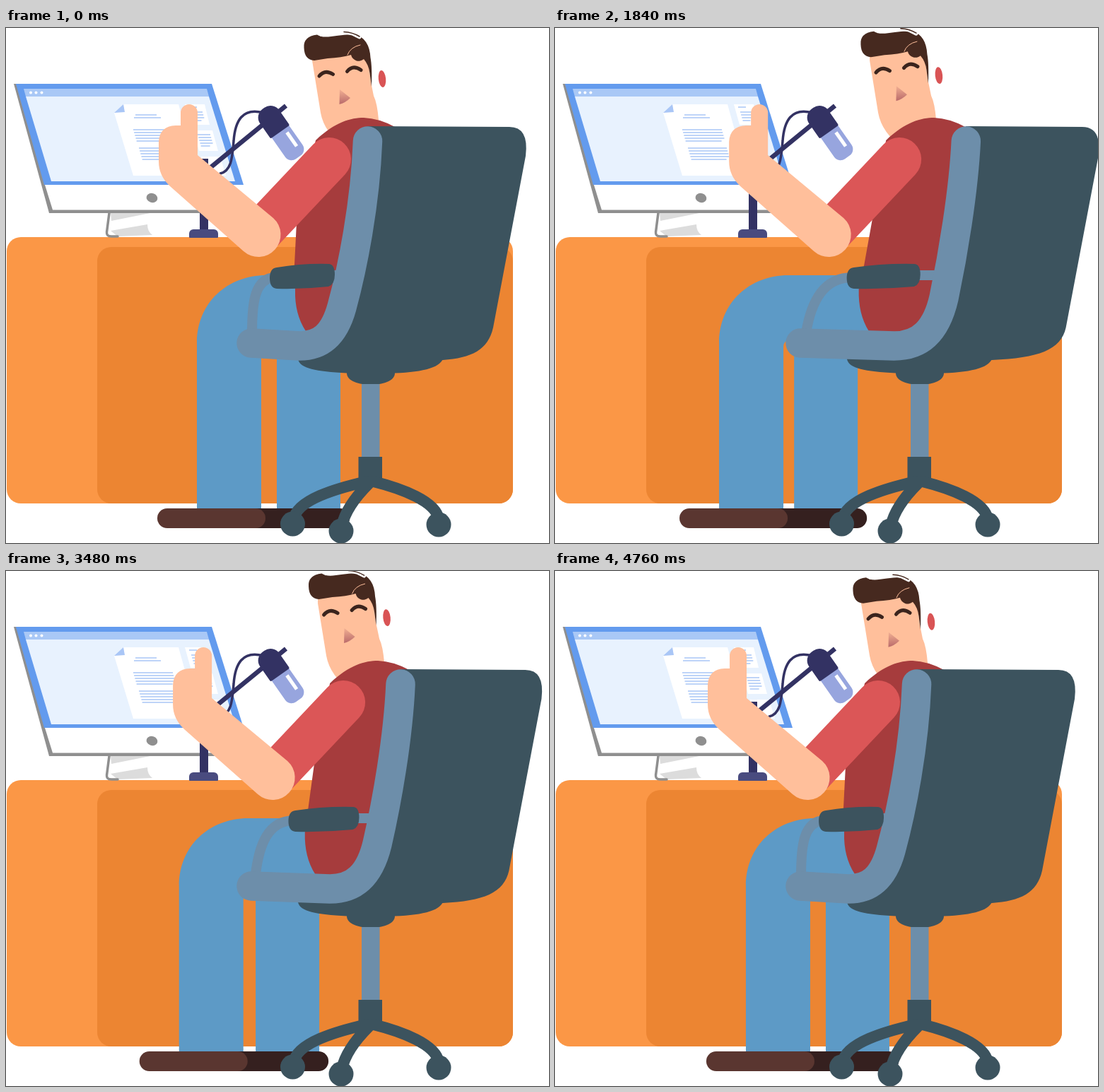
These frames come from a looping animation (768x729 px, 4800 ms). An HTML page with a canvas:

```html
<!DOCTYPE html>
<html lang="en">
<head>
<meta charset="utf-8">
<title>Podcaster in a swivel chair</title>
<style>
html, body { margin: 0; width: 100%; height: 100%; overflow: hidden; background: #fff; }
canvas { display: block; }
</style>
</head>
<body>
<canvas id="stage" width="768" height="729"></canvas>
<script>
const ctx = document.getElementById('stage').getContext('2d');
const LOOP = 4800, STEP = 40;
const SKIN = '#ffbf9b', HAIR = '#46291f', JEANS = '#5d9ac6', FRAME = '#6d8eaa',
  CHAIR = '#3c535e', NAVY = '#333263', SHIRT = '#a63c3d', SLEEVE = '#db5657';

const fill = (color, d) => { ctx.fillStyle = color; ctx.fill(new Path2D(d)); };
const line = (color, width, d, cap = 'round') => {
  ctx.strokeStyle = color;
  ctx.lineWidth = width;
  ctx.lineCap = cap;
  ctx.lineJoin = 'round';
  ctx.stroke(new Path2D(d));
};
const box = (color, x, y, w, h, r = 0) => {
  ctx.fillStyle = color;
  ctx.beginPath();
  ctx.roundRect(x, y, w, h, r);
  ctx.fill();
};
const oval = (color, x, y, rx, ry = rx, turn = 0) => {
  ctx.fillStyle = color;
  ctx.beginPath();
  ctx.ellipse(x, y, rx, ry, turn, 0, 7);
  ctx.fill();
};
const shifted = (x, y, draw) => {
  ctx.save();
  ctx.translate(x, y);
  draw();
  ctx.restore();
};

// Eased swing 0 -> 1 -> 0 over one period
function swing(t, period) {
  const u = t % period / period * 2, v = u > 1 ? 2 - u : u;
  return v * v * (3 - 2 * v);
}

function desk() {
  box('#fb9746', 1, 296, 716, 377, 20);
  box('#ec8532', 129, 310, 588, 363, 20);
}

function textRows(x, y, width, rows, gap = 4) {
  for (let i = 0; i < rows; i++) {
    const left = x + i * gap * .29;
    line('#a9c6f6', 1.5, `M${left} ${y + i * gap}h${i == rows - 1 ? width - 5 : width}`, 'butt');
  }
}

function monitor() {
  fill('#dcdcdc', 'M148 262H204L149 273ZM148 287L200 278Q200 288 207 293L158 295Z');
  line('#8f8f8f', 3.5, 'M146 262L142.500 289Q142 295 149 295H158');
  fill('#8f8f8f', 'M11 79H40L110 257H346V262H61Z');
  fill('#fff', 'M55 222H336L346 257.500H66Z');
  fill('#639bee', 'M14 79H291L336 222H54Z');
  fill('#a9c8f6', 'M25 86H284L287 97H28Z');
  fill('#e8f2fe', 'M28 97H287L324 217H64Z');
  for (const x of [35, 42.5, 50.5]) oval('#fff', x, 91.5, 2);
  fill('#fff', 'M166 108H244L272 209H180L153 120ZM253 108H281L288 137H261ZM265 145H292L300 174H273ZM276 182H303L311 209H284Z');
  fill('#a9c6f6', 'M153 120L166 108L168 119Z');
  textRows(183, 123, 35, 1);
  textRows(181, 127, 43, 1);
  textRows(180, 144, 56, 5);
  textRows(188, 170, 55, 5);
  textRows(259, 112, 16, 1);
  textRows(262, 119, 16, 4);
  textRows(271, 151, 18, 5);
  oval('#8f8f8f', 206.5, 240.5, 8, 6.5, .3);
}

function microphone() {
  box(NAVY, 274, 185, 12, 104);
  box('#494b7f', 259, 285, 41, 12, [6, 6, 1, 1]);
  line(NAVY, 6.5, 'M280 205L396 110', 'butt');
  line(NAVY, 3.5, 'M303 206C320 202 320 180 322 160C324 132 334 112 364 120');
  ctx.save();
  ctx.translate(375, 128);
  ctx.rotate(.96);
  box('#97a5de', 20, -15, 47, 30, [0, 11, 11, 0]);
  line('#fff', 5, 'M29 -7H53', 'butt');
  box(NAVY, -18, -16, 41, 33, [15, 2, 2, 15]);
  ctx.restore();
}

function legs(p) {
  const front = -44 * p, back = -52 * p;
  box('#35201f', 333 + back, 680, 153, 28, 14);
  box(JEANS, 383 + back, 440, 90, 240);
  box('#5a3630', 214 + front, 680, 153, 28, 14);
  const x = 270 + front;
  fill(JEANS, `M${x} 680V446C${x} 389 ${x + 43} 350 ${x + 98} 350H450V442H${x + 100}Q${x + 91} 442 ${x + 91} 452V680Z`);
}

function face(p, hx, hy) {
  const a = 14 * p;
  fill(SKIN, `M${433 + a} 40V46L${445 + a} 120Q${450 + a} 148 ${480 + a} 170H${540 + a}
    L${527 + a} 130Q${525 + a} 106 ${520 + a} 96L${516 + hx} ${76 + hy}L${510 + hx} ${28 + hy}Z`);
  shifted(hx, hy, () => {
    fill(HAIR, `M421.500 28Q420 12 440 9.500Q446 14 460 12Q480 9 494 9Q514 15 515.500 42Q518 55 517 83
      L514.500 64Q513 52 506 44A11 11 0 0 1 488 38Q475 42 455 43L436 46Q422 45 421.500 28Z`);
    line('#fff', 5, 'M446 9.500Q472 3 490 8L500 13');
    line(HAIR, 1.5, 'M478 5.500Q490 6 500 12');
    line(SKIN, 1, 'M483 38Q487 27 501 24');
    line('#3b241d', 5, 'M443 68Q451 58 462.500 65.500M482.500 61.500Q490.500 51.500 502 59.500');
    const shade = ctx.createLinearGradient(476, 86, 477, 108);
    shade.addColorStop(0, '#f4b294');
    shade.addColorStop(1, '#b96a6a');
    fill(shade, 'M472 87L487 99Q480 106 471.500 108Z');
    oval('#d95455', 532, 72, 5.2, 12, -.1);
  });
}

function torso(p) {
  const s = 35 * p;
  fill(SHIRT, `M${438 + s} 159C${465 + s} 133 ${488 + s} 127 ${506 + s} 127Q${528 + s} 128 ${550 + s} 140
    L${508 + 81 * p} 200L${478 + 81 * p} 380L${440 + 60 * p} 445H${433 + 23 * p}
    L${424 + 23 * p} 429Q${408 + 24 * p} 405 ${409 + 24 * p} 370L${408 + 34 * p} 335L${411 + 43 * p} 275Z`);
}

function chair(p) {
  const s = 39 * p, b = 81 * p, pad = 373 + 46 * p, end = 465 + 60 * p;
  const post = `M${511.5 + b} 160C${508 + b} ${250 - 20 * p} ${490 + 84 * p} ${340 - 20 * p} ${475 + 87 * p} ${395 - 15 * p}
    C${464 + 88 * p} ${435 - 10 * p} ${445 + 85 * p} 450 ${415 + 75 * p} 450`;
  line(FRAME, 14, `M${end - 10} 350H${500 + 60 * p}`, 'butt');
  line(FRAME, 14, `M${348 + 8 * p} 432C${348 + 17 * p} ${390 - 5 * p} ${351 + 34 * p} 353 ${382 + 45 * p} 353`);
  fill(CHAIR, `${post}V470H618C${658 + 30 * p} 467 ${682 + s} 456 ${689 + s} 424
    L${735 + s} 181Q${740 + s} 140 ${712 + s} 140L${511 + b} 139Z`);
  fill(CHAIR, 'M413 460V469C416 482 438 486 482 488.500C482 500 500 505 516 505S550 500 550 488.500C592 487 617 480 619 465V460Z');
  line(FRAME, 41.5, `${post}L347 446`);
  fill(CHAIR, `M${pad + 10} 339Q${(pad + end) / 2} 333 ${end - 8} 334Q${end} 335 ${end} 349T${end - 9} 366
    Q${(pad + end) / 2} 370 ${pad + 10} 369Q${pad} 368 ${pad} 354T${pad + 10} 339Z`);
  box(FRAME, 503, 504, 25.5, 104);
  box(CHAIR, 498.5, 607, 33.5, 34);
  line(CHAIR, 16, 'M510 642C466 652 412 668 407 695M513 645C498 660 480 681 475 705M520 642C560 652 608 670 612 695');
  oval(CHAIR, 405.5, 702, 17.5);
  oval(CHAIR, 474, 712, 17.5);
  oval(CHAIR, 612, 703, 17.5);
}

function arm(p) {
  shifted(35 * p, 0, () => {
    line(SLEEVE, 62, 'M457 186L357 292');
    fill(SKIN, `M216 161Q217 139 240 138H247V120A12 12 0 0 1 271 120V180L378 269
      A31 31 0 0 1 336 316L232 224Q216 209 216 189Z`);
  });
}

function draw(now) {
  const t = Math.floor(now % LOOP / STEP) * STEP;
  const p = swing(t, LOOP);
  const headX = 14 * p - 5.3 * swing(t, 1600), headY = -7.5 * swing(t, 800);
  ctx.fillStyle = '#fff';
  ctx.fillRect(0, 0, 768, 729);
  desk();
  monitor();
  microphone();
  legs(p);
  face(p, headX, headY);
  torso(p);
  chair(p);
  arm(p);
}

const start = performance.now();
function tick() {
  draw(performance.now() - start);
  requestAnimationFrame(tick);
}
tick();
</script>
</body>
</html>
```
